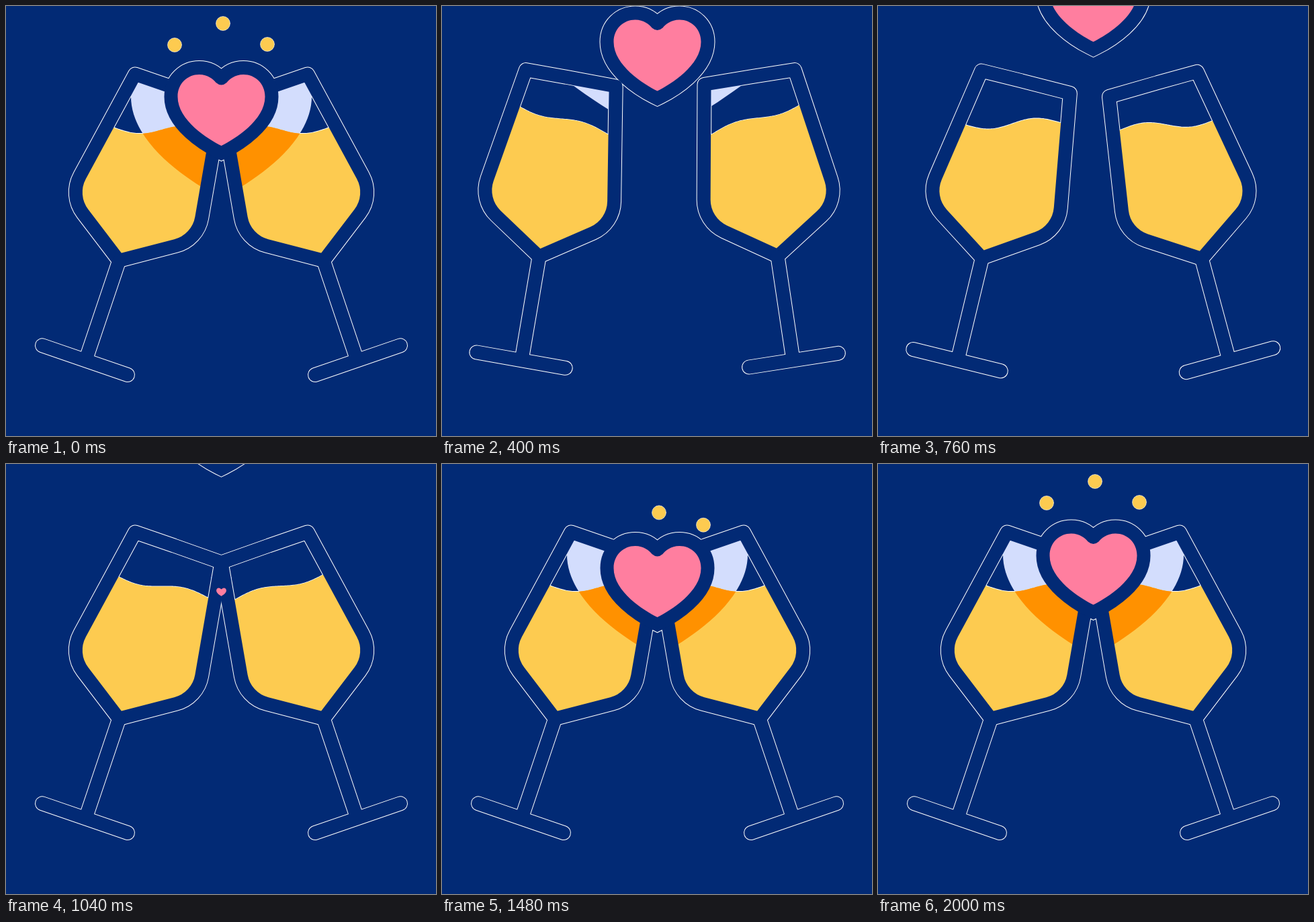
An HTML page with a canvas for the animation above (2.04 s loop, 640x640 px).

```html
<!DOCTYPE html>
<html>
<head>
<meta charset="utf-8">
<title>Toast</title>
<style>
html, body { margin: 0; width: 100%; height: 100%; overflow: hidden; background: #022a75; }
canvas { display: block; }
</style>
</head>
<body>
<canvas id="stage" width="640" height="640"></canvas>
<script>
const ctx = document.getElementById('stage').getContext('2d');
const NAVY = '#022a75', GOLD = '#fdcb50', ORANGE = '#ff9100', PINK = '#ff7e9f', ICE = '#d3ddfd';
const LOOP = 2040, STEP = 40, AXIS = 320.5, LINE = 20;
const PIVOT = [117.5, 527];

const heart = new Path2D(`M0 53C-20 43-65 15-65-20C-65-40-50-53-33-53
  C-20-53-12-46-8-41Q0-34 8-41C12-46 20-53 33-53C50-53 65-40 65-20C65 15 20 43 0 53Z`);

const bowl = new Path2D();
bowl.moveTo(250, 121.5);
bowl.lineTo(320.5, 146.5);
bowl.arcTo(285.5, 348.5, 168, 379, 52);
bowl.lineTo(168, 379);
bowl.arcTo(94, 282, 192, 101.5, 52);
bowl.lineTo(192, 101.5);
bowl.closePath();

const stem = new Path2D('M168 380L118.5 527M54 505.3L181 549');

// Surface of the drink, centred on its middle point
const liquid = new Path2D();
for (let x = -200; x <= 200; x += 2) liquid.lineTo(x, 7 * Math.sin((x + 68) / 68 * Math.PI));
liquid.lineTo(200, 400);
liquid.lineTo(-200, 400);
liquid.closePath();

const clamp = x => Math.max(0, Math.min(1, x));
const smooth = x => x * x * (3 - 2 * x);
const ease = x => (x + smooth(x)) / 2;

function track(t, keys) {
  let v = keys[0][1];
  for (let i = 1; i < keys.length; i++) {
    const [t0, v0] = keys[i - 1], [t1, v1] = keys[i];
    if (t >= t0) v = v0 + (v1 - v0) * ease(clamp((t - t0) / (t1 - t0)));
  }
  return v * Math.PI / 180;
}

const glasses = [
  { swing: [[0, 0], [480, 10.2], [1040, 0]],
    slosh: [[0, 1.7], [430, 18], [760, -2], [1050, 13.5], [1400, 1.7]] },
  { mirror: true, swing: [[0, 0], [460, 11.1], [920, 0]],
    slosh: [[0, 1.7], [430, 19], [760, 5.5], [1050, 16], [1400, 1.7]] }
];

const dots = [
  { x: 323, y: 26, rise: 1300, shrink: 200 },
  { x: 389, y: 57, rise: 1300, shrink: 40 },
  { x: 251, y: 58, rise: 1460, shrink: 160 }
];

function at(x, y, scale, draw) {
  ctx.save();
  ctx.translate(x, y);
  ctx.scale(scale, scale);
  draw();
  ctx.restore();
}

function inGlass(g, t, draw) {
  const turn = track(t, g.swing);
  ctx.save();
  if (g.mirror) ctx.transform(-1, 0, 0, 1, 2 * AXIS, 0);
  ctx.translate(...PIVOT);
  ctx.rotate(-turn);
  ctx.translate(-PIVOT[0], -PIVOT[1]);
  draw(turn);
  ctx.restore();
}

function outline(t, hearts, color, extra) {
  ctx.strokeStyle = ctx.fillStyle = color;
  for (const g of glasses) inGlass(g, t, () => {
    ctx.lineWidth = LINE + extra;
    ctx.stroke(bowl);
    ctx.stroke(stem);
  });
  for (const h of hearts) at(AXIS, h.y, h.s, () => {
    ctx.lineJoin = 'miter';
    ctx.lineWidth = 2 * LINE + extra / h.s;
    ctx.stroke(heart);
    ctx.fill(heart);
  });
}

function drink(g, t, lens) {
  const fillLens = color => {
    if (!lens) return;
    ctx.save();
    ctx.resetTransform();
    ctx.fillStyle = color;
    at(AXIS, lens.y, lens.s, () => ctx.fill(heart));
    ctx.restore();
  };
  inGlass(g, t, turn => {
    const tilt = track(t, g.slosh), lean = Math.abs(tilt);
    ctx.clip(bowl);
    ctx.translate(231, 184.5);
    ctx.rotate(tilt + turn);
    // A leaning surface rises a little and its wave flattens
    ctx.translate(0, -10 * lean);
    ctx.scale(1, 1 - lean);
    ctx.strokeStyle = '#fff';
    ctx.lineWidth = 2;
    ctx.stroke(liquid);
    fillLens(ICE);
    ctx.fillStyle = GOLD;
    ctx.fill(liquid);
    ctx.clip(liquid);
    fillLens(ORANGE);
  });
}

function drawDot(d, t) {
  const rising = t >= d.rise;
  const r = rising ? 10.5 : 10.5 * (1 - clamp((t - d.shrink) / 160));
  if (r <= 0) return;
  const y = rising ? 140 + (d.y - 140) * smooth(clamp((t - d.rise) / 320)) : d.y;
  ctx.beginPath();
  ctx.arc(d.x, y, r, 0, 7);
  ctx.fillStyle = GOLD;
  ctx.fill();
  ctx.strokeStyle = '#fff';
  ctx.lineWidth = 0.6;
  ctx.stroke();
}

function render(t) {
  const hearts = [];
  let lens;
  if (t < 1160) hearts.push({ y: 155 - 0.2035 * t, s: 1 });
  if (t < 900) lens = { y: 176 - 0.555 * t, s: 2.07 + 0.0062 * t };
  if (t > 1000) {
    const s = clamp((t - 1000) / 350);
    hearts.push({ y: 155 + 0.0356 * (LOOP - t), s });
    lens = { y: 176, s: 2.07 * s };
  }

  ctx.resetTransform();
  ctx.fillStyle = NAVY;
  ctx.fillRect(0, 0, 640, 640);
  ctx.lineJoin = ctx.lineCap = 'round';

  dots.forEach(d => drawDot(d, t));
  outline(t, hearts, '#fff', 2);
  glasses.forEach(g => drink(g, t, lens));
  outline(t, hearts, NAVY, 0);
  ctx.fillStyle = PINK;
  for (const h of hearts) at(AXIS, h.y, h.s, () => ctx.fill(heart));
}

const start = performance.now();
function loop() {
  const t = (performance.now() - start) % LOOP;
  render(Math.floor(t / STEP) * STEP);
  requestAnimationFrame(loop);
}
loop();
</script>
</body>
</html>
```
